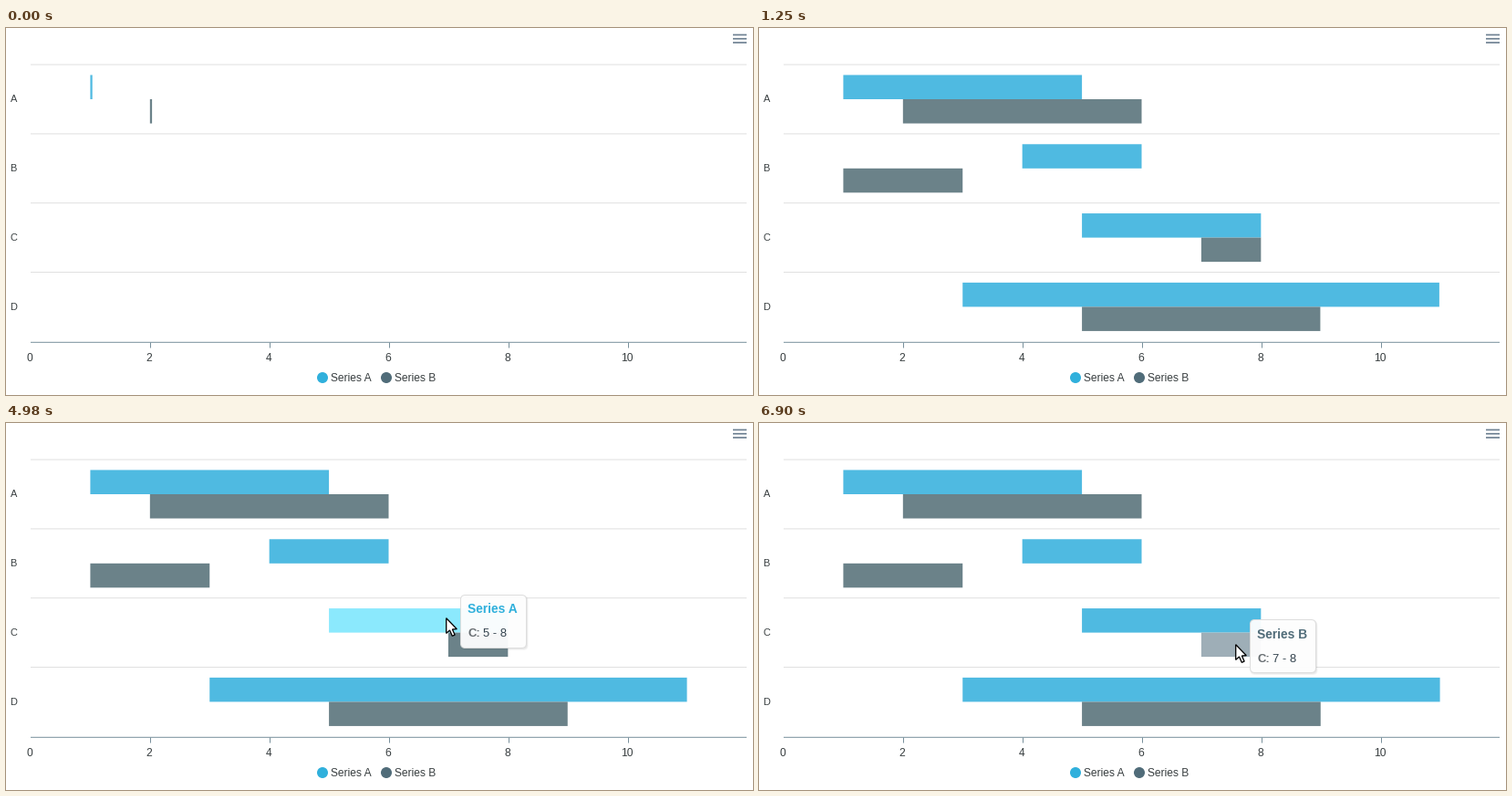
Write a matplotlib script that moves like this. It is 819 px wide and 402 px high and loops after 8170 ms.

```python
import numpy as np
import matplotlib.pyplot as plt
from matplotlib.animation import FuncAnimation
from matplotlib.patches import Circle, FancyBboxPatch, Polygon, Rectangle

W, H, DPI = 819, 402, 72
LOOP, STEP = 8170, 19
FRAMES = LOOP // STEP

X0, UNIT = 27, 785 / 12
TOP, ROW = 40.1, 75.8
BAR_H = ROW * 0.35

FILL = ["#4fbae1", "#6b8289"]
HOVER = ["#8be9fd", "#9eaeb7"]
SOLID = ["#30b0dc", "#506c79"]
INK, AXIS = "#373d3f", "#78909c"

# first and last value of each bar, per series
RANGES = {
    "A": [(1, 5), (4, 6), (5, 8), (3, 11)],
    "B": [(2, 6), (1, 3), (7, 8), (5, 9)],
}
ROWS, SERIES = "ABCD", "AB"

GROW, STAGGER, HEAD_START = 800, 167, 38
SHOW, JUMP = 3850, 3980     # the pointer appears, then hops up
HOVER_LEAD = 60             # highlights run ahead of the drawn pointer

# time, x, y where the pointer rests or turns
STOPS = [
    (4250, 536, 370), (4980, 482, 213), (5480, 482, 213), (5700, 432, 235),
    (6150, 472, 233), (6200, 493, 234), (6650, 522, 239), (6900, 522, 242),
]

fig = plt.figure(figsize=(W / DPI, H / DPI), dpi=DPI, facecolor="white")
ax = fig.add_axes([0, 0, 1, 1])
ax.set(xlim=(0, W), ylim=(H, 0))
ax.axis("off")


def label(x, y, text, size, color=INK, ha="left", **kw):
    return ax.text(x, y, text, fontsize=size, color=color, ha=ha,
                   va="baseline", family="Liberation Sans", **kw)


def line(xs, ys, color, width=1, **kw):
    ax.plot(xs, ys, color=color, lw=width, solid_capstyle="butt", **kw)


def draw_chart():
    for k, name in enumerate(ROWS):
        y = TOP + k * ROW
        line([X0, 812], [y, y], "#e0e0e0", snap=False)
        label(8.3, 81 + 76 * k, name, 11, ha="center")
    line([X0, 812], [TOP + 4 * ROW + 1] * 2, AXIS, snap=False, zorder=4)
    for v in range(0, 12, 2):
        x = X0 + 65.5 * v
        if v:
            line([x + 0.2] * 2, [344, 350], AXIS)
        label(x - 1.1, 365, str(v), 12, ha="center")
    for s, name in enumerate(SERIES):
        x = 347 + 70 * s
        ax.add_patch(Circle((x, 383), 6, fc=SOLID[s], lw=0))
        label(x + 9, 387, "Series " + name, 12)
    for k in range(3):
        y = 7.5 + 4.25 * k
        line([797, 812], [y, y], "#6e8192", 1.7, snap=False)


def bar_rect(s, r):
    """Left, top and full width of a bar."""
    lo, hi = RANGES[SERIES[s]][r]
    top = TOP + ROW * (r + 0.15) + s * BAR_H
    return X0 + lo * UNIT, top, (hi - lo) * UNIT


def make_bar(s, r):
    x, y, _ = bar_rect(s, r)
    return ax.add_patch(Rectangle((x, y), 0, BAR_H, fc=FILL[s], lw=0,
                                  snap=False, zorder=3))


def make_box(color, z):
    return ax.add_patch(FancyBboxPatch(
        (0, 0), 72, 58, boxstyle="round,pad=0,rounding_size=5",
        fc=color, lw=0, zorder=z))


draw_chart()
bars = {(s, r): make_bar(s, r) for s in range(2) for r in range(4)}

shadows = [make_box("#666666", 5) for _ in range(3)]
tip_box = make_box("white", 6)
tip_box.set(edgecolor="#dcdcdc", linewidth=1)
tip_title = label(0, 0, "", 13.8, weight="bold", zorder=7)
tip_key = label(0, 0, "", 13, "#666c70", weight="bold", zorder=7)
tip_value = label(0, 0, "", 13, "#33424d", zorder=7)
TIP_TEXTS = [(tip_title, 8, 20), (tip_key, 8, 46), (tip_value, 24.5, 46)]

ARROW = np.array([(0, 0), (0, 16.7), (3.8, 13.3), (6.6, 19.6), (9.4, 18.4),
                  (6.7, 12.3), (11.6, 12)])
pointer = ax.add_patch(Polygon(ARROW, closed=True, fc="white", ec="black",
                               lw=1.3, joinstyle="miter", zorder=9))


def time_of(i):
    return (i + 0.5) * STEP


def pointer_at(t):
    """Ease from stop to stop."""
    if t < JUMP:
        return np.array([536, 390])
    pos = np.array(STOPS[0][1:], float)
    for (t0, *a), (t1, *b) in zip(STOPS, STOPS[1:]):
        if t >= t0:
            p = min((t - t0) / (t1 - t0), 1)
            pos = np.array(a) + np.subtract(b, a) * p * p * (3 - 2 * p)
    return pos


def bar_under(point):
    px, py = point
    for s, r in bars:
        x, y, width = bar_rect(s, r)
        if x <= px < x + width and y <= py < y + BAR_H:
            return s, r
    return None


def follow_pointer():
    """Hovered bar and tooltip position, opacity and subject per frame."""
    pos, alpha, shown, states = np.zeros(2), 0.0, None, []
    for i in range(FRAMES):
        spot = pointer_at(time_of(i) + HOVER_LEAD)
        hit = bar_under(spot)
        if hit:
            shown = hit
            pos = pos + (spot + (17, -26) - pos) * (1 - np.exp(-STEP / 60))
        alpha += ((hit is not None) - alpha) * (1 - np.exp(-STEP / 42))
        states.append((hit, pos, alpha, shown))
    return states


STATES = follow_pointer()


def update_bars(t, hit):
    for (s, r), bar in bars.items():
        p = np.clip((t + HEAD_START - STAGGER * r) / GROW, 0, 1)
        bar.set_width(bar_rect(s, r)[2] * (1 - np.cos(np.pi * p)) / 2)
        bar.set_facecolor((HOVER if hit == (s, r) else FILL)[s])


def update_tip(pos, alpha, shown):
    visible = shown is not None and alpha > 0.02
    for art in [tip_box, *shadows, *(text for text, _, _ in TIP_TEXTS)]:
        art.set_visible(visible)
    if not visible:
        return
    x, y = np.round(pos) - 0.5
    s, r = shown
    tip_box.set_bounds(x, y, 72, 58)
    tip_box.set_alpha(0.95 * alpha)
    for k, shadow in enumerate(shadows):
        shadow.set_bounds(x + 1 - k * 0.5, y + 1, 72 + k, 58 + k * 0.7)
        shadow.set_alpha(0.05 * alpha)
    tip_title.set_text("Series " + SERIES[s])
    tip_title.set_color(SOLID[s])
    tip_key.set_text(ROWS[r] + ":")
    tip_value.set_text("{} - {}".format(*RANGES[SERIES[s]][r]))
    for text, dx, dy in TIP_TEXTS:
        text.set_position((x + dx, y + dy))
        text.set_alpha(alpha)


def update(i):
    t = time_of(i)
    hit, *tip = STATES[i]
    update_bars(t, hit)
    update_tip(*tip)
    pointer.set_visible(t >= SHOW)
    pointer.set_xy(ARROW + pointer_at(t) + 0.7)
    return []


anim = FuncAnimation(fig, update, frames=FRAMES, interval=STEP,
                     init_func=lambda: update(0), repeat=True, repeat_delay=0)
plt.show()
```
